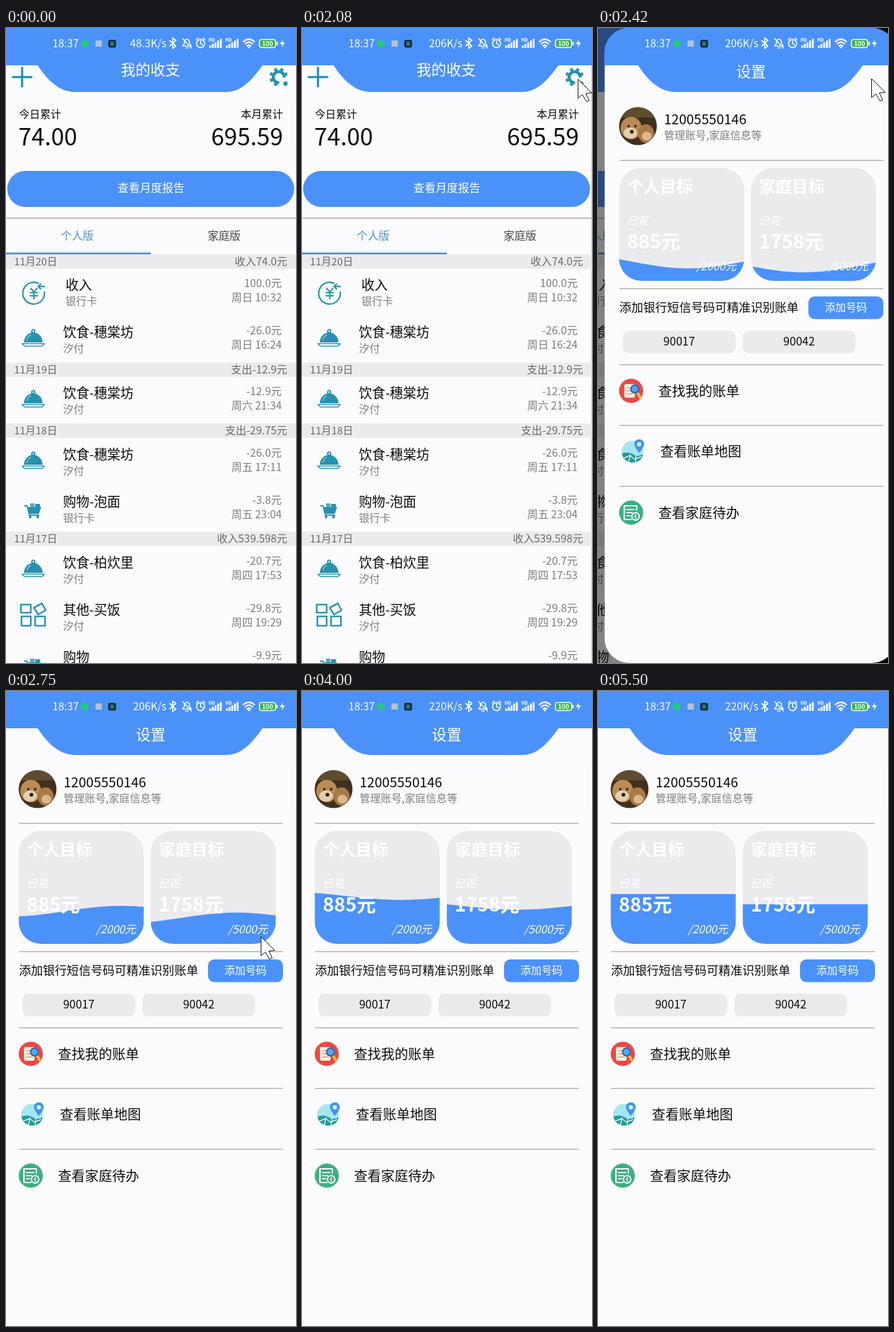
Recreate the animation shown at these times as an HTML page. Size 468 by 1022 pixels, loop 5910 ms.

```html
<!DOCTYPE html>
<html lang="zh-CN">
<head>
<meta charset="utf-8">
<title>我的收支</title>
<style>
html, body { margin: 0; width: 100%; height: 100%; overflow: hidden; background: #000; }
svg { display: block; width: 100vw; height: 100vh; }
text { font-family: "Noto Sans CJK SC", "Noto Sans CJK", "Noto Sans", sans-serif; white-space: pre; }
</style>
</head>
<body>
<svg id="stage" viewBox="0 0 468 1022" xmlns="http://www.w3.org/2000/svg"></svg>
<script>
const LOOP = 5910, STEP = 1000 / 12;
const BLUE = '#4b91fa', TEAL = '#2691b0', PAGE = '#fcfcfe', PALE = '#ebebee',
  INK = '#0c0c0c', GRAY = '#7d7d7a', RULE = '#a3a397';

const text = (x, y, size, str, fill = INK, attrs = '') =>
  `<text x="${x}" y="${y}" font-size="${size}" fill="${fill}" ${attrs}>${str}</text>`;
const END = 'text-anchor="end"', MID = 'text-anchor="middle"', MEDIUM = 'font-weight="500"',
  BOLD = 'font-weight="700"', ITALIC = 'font-style="italic"';
const rect = (x, y, w, h, fill, r = 0) =>
  `<rect x="${x}" y="${y}" width="${w}" height="${h}" rx="${r}" fill="${fill}"/>`;
const line = (x1, x2, y) => rect(x1, y - .6, x2 - x1, 1.3, RULE);
const at = (x, y, body) => `<g transform="translate(${x} ${y})">${body}</g>`;
const stroke = (d, color, width = 2) =>
  `<path d="${d}" fill="none" stroke="${color}" stroke-width="${width}" stroke-linecap="round" stroke-linejoin="round"/>`;
const shape = (d, fill) => `<path d="${d}" fill="${fill}"/>`;
const disc = (x, y, r, fill) => `<circle cx="${x}" cy="${y}" r="${r}" fill="${fill}"/>`;
const oval = (x, y, rx, ry, fill) => `<ellipse cx="${x}" cy="${y}" rx="${rx}" ry="${ry}" fill="${fill}"/>`;

const header = title => shape('M-4 -1H480V60H414C398 82 381 103 355 103H113C84 103 66 82 51 60H-4Z', BLUE) + title;

const icons = {
  income: stroke('M7 -16A17.500 17.500 0 1 0 17 -2M17 -11H7M11 -15L7 -11L11 -7', TEAL, 2.4) +
    stroke('M-5 -8L0 -2L5 -8M0 -2V9M-6 -1H6M-6 4H6', TEAL, 2.2),
  dish: shape('M-15 7A15 16 0 0 1 15 7Z', TEAL) + disc(0, -11, 3.5, TEAL) + disc(0, -11, 1.4, PAGE) +
    stroke('M-10 3A11 11 0 0 1 -4 -5', '#8cc6d5', 1.5) + stroke('M-18 9H18L14 13H-14Z', TEAL, 1.7),
  cart: stroke('M-14 -7H-10L-6 8H9', TEAL, 2) + shape('M-10 -5H13L9 6H-7Z', TEAL) +
    rect(-5, -11, 7, 6, '#5aa9b9') + rect(3, -10, 8, 5, TEAL) + disc(-5, 11, 2.2, TEAL) + disc(7, 11, 2.2, TEAL),
  blocks: stroke('M-17 -16H-4V-3H-20V-16ZM-19 3H-4V18H-19ZM3 3H19V18H3ZM1 -11L14 -18L20 -7L8 0Z', TEAL, 2.6),
  gear: stroke('M-1.500 9A9 9 0 1 1 9 -1.500', TEAL, 5) +
    `<path d="M-2.500 12.800A13 13 0 1 1 12.800 -2.500" fill="none" stroke="${TEAL}" stroke-width="4" stroke-dasharray="5 5.200"/>` +
    disc(11, 10.500, 3.5, TEAL),
  search: disc(0, 0, 19.500, '#ee4842') + rect(-11, -11, 17, 22, '#f6f1e8', 2) +
    stroke('M-7 -5H-1M-7 0H-1M-7 5H2', '#d5a063', 1.5) + stroke('M10 3L15 11', '#f5c33d', 4) +
    disc(6, -3, 7.500, '#2d6cb4') + disc(6, -3, 5, '#4fa4ee'),
  map: disc(-1, 1, 17.500, '#a8e5f2') + shape('M-18 4Q-8 0 0 5T16 5Q14 18 -1 18.500Q-15 17 -18 4Z', '#1e9c9b') +
    stroke('M-14 11L-5 7L3 13L13 9M-4 6L-7 17M5 7L4 17', '#e8f4f0', 1.5) +
    shape('M10 3Q2 -7 2 -11A8 8 0 0 1 18 -11Q18 -7 10 3Z', '#4294ea') + disc(10, -11, 3.5, '#d9effb'),
  todo: disc(0, 0, 19.500, '#3cb083') + stroke('M9 -4V-11H-11V11H0M-7 -5H5M-7 0H1M-7 5H-2', '#fff', 2.2) +
    disc(7, 6, 7, '#fff') + disc(7, 6, 5, '#3cb083') + stroke('M8 3L6 6L8 9', '#fff', 1.5)
};

const strips = [
  [376, '11月20日', '收入74.0元'], [550, '11月19日', '支出-12.9元'],
  [648, '11月18日', '支出-29.75元'], [822, '11月17日', '收入539.598元']
];
const rows = [
  [413, 'income', '收入', '银行卡', '100.0元', '周日 10:32'],
  [489, 'dish', '饮食-穗棠坊', '汐付', '-26.0元', '周日 16:24'],
  [587, 'dish', '饮食-穗棠坊', '汐付', '-12.9元', '周六 21:34'],
  [686, 'dish', '饮食-穗棠坊', '汐付', '-26.0元', '周五 17:11'],
  [762, 'cart', '购物-泡面', '银行卡', '-3.8元', '周五 23:04'],
  [860, 'dish', '饮食-柏炊里', '汐付', '-20.7元', '周四 17:53'],
  [936, 'blocks', '其他-买饭', '汐付', '-29.8元', '周四 19:29'],
  [1012, 'cart', '购物', '银行卡', '-9.9元', '周四 20:15']
];
const iconDrop = { income: 14, dish: 10, cart: 14, blocks: 8 };

const strip = ([y, day, sum]) => rect(0, y - 11.500, 468, 23, PALE) +
  text(13, y + 6, 16.5, day, '#6a6a6a') + text(454, y + 6, 17.2, sum, '#6a6a6a', END);
const row = ([y, icon, title, sub, sum, time]) => {
  const x = icon === 'income' ? 96 : 92;
  return at(x === 96 ? 45 : 44, y + iconDrop[icon], icons[icon]) +
    text(x, y + 8, 21.3, title, INK, MEDIUM) + text(x, y + 32.500, 17, sub, GRAY) +
    text(445, y + 4, 17.4, sum, GRAY, END) + text(445, y + 27, 17.2, time, GRAY, END);
};

const home = rect(0, 0, 468, 1022, PAGE) + header(text(233, 76, 24, '我的收支', '#fff', MID)) +
  stroke('M26 64V94M11 79H41', TEAL, 3.6) + at(440, 79, icons.gear) +
  text(21, 145, 17, '今日累计', INK, MEDIUM) + text(447, 145, 17, '本月累计', INK, `${END} ${MEDIUM}`) +
  text(20, 189, 38, '74.00') + text(447, 189, 38, '695.59', INK, END) +
  rect(2, 230, 463, 58, BLUE, 29) + text(234, 264, 18, '查看月度报告', '#fff', `${MID} ${MEDIUM}`) +
  rect(0, 305.500, 468, 1.2, '#8d8d88') +
  text(115, 341, 17.7, '个人版', '#4793c8', MID) + text(352, 341, 17.7, '家庭版', '#444', MID) +
  rect(0, 361.500, 234, 3, '#458bd8') + strips.map(strip).join('') + rows.map(row).join('');

const goals = [
  { x: 20.5, name: '个人目标', spent: 885, limit: 2000, lag: 0 },
  { x: 233.5, name: '家庭目标', spent: 1758, limit: 5000, lag: .13 }
];
const CARD = { y: 225, w: 202, h: 182, r: 36 };
const goalCard = ({ x, name, spent, limit }, i) => at(x, 0,
  `<clipPath id="clip${i}">${rect(0, CARD.y, CARD.w, CARD.h, '#000', CARD.r)}</clipPath>` +
  rect(0, CARD.y, CARD.w, CARD.h, PALE, CARD.r) +
  `<path id="wave${i}" fill="${BLUE}" clip-path="url(#clip${i})"/>` +
  text(13, 265, 26.4, name, '#fff', BOLD) + text(13, 316, 17, '已花', '#fff', ITALIC) +
  text(13, 355, 31, spent + '元', '#fff', BOLD) +
  text(189, 390, 17.8, `/${limit}元`, '#fff', `${END} ${ITALIC}`));
const chip = (x, label) => rect(x, 487, 182, 36.500, PALE, 10) + text(x + 91, 511, 18.3, label, INK, MID);
const menuItem = (y, icon, x, label) => at(x - 44, y, icons[icon]) + text(x, y + 8, 21.8, label);

const avatar = '<clipPath id="face"><circle cx="51" cy="158" r="30.500"/></clipPath><g clip-path="url(#face)">' +
  rect(20, 127, 62, 62, '#3f3020') + rect(20, 127, 62, 17, '#5d4c2e') +
  oval(40, 161, 17, 18, '#b98a55') + oval(39, 169, 11, 9, '#e3cfae') +
  oval(64, 170, 13, 15, '#a87845') + oval(65, 174, 8, 7, '#d6b98f') +
  disc(36, 158, 2, '#2b2115') + disc(47, 158, 2, '#2b2115') + disc(41, 167, 3, '#2b2115') + '</g>';

const settings = `<clipPath id="edge"><rect id="sheet" x="-3" width="471" height="1022"/></clipPath><g clip-path="url(#edge)">` +
  rect(-3, 0, 471, 1022, PAGE) + header(text(233.5, 79, 24, '设置', '#fff', MID)) + avatar +
  text(93, 155, 21.8, '12005550146') + text(93, 179, 17, '管理账号,家庭信息等', GRAY) +
  [213, 419.5, 542, 639.5, 737.5].map(y => line(21, 447, y)).join('') + goals.map(goalCard).join('') +
  text(21, 457, 19.3, '添加银行短信号码可精准识别账单') +
  rect(326, 432, 121, 36.500, BLUE, 10) + text(386.500, 456, 17, '添加号码', '#fff', MID) +
  chip(26.5, '90017') + chip(220, '90042') +
  menuItem(584, 'search', 84, '查找我的账单') + menuItem(681, 'map', 87, '查看账单地图') +
  menuItem(780, 'todo', 84, '查看家庭待办') + '</g>';

const signal = x => text(x, 22, 7, 'HD', '#fff', BOLD) +
  [0, 1, 2, 3, 4].map(i => rect(x + 1 + i * 4.3, 28 - i * 2.6, 3, 4 + i * 2.6, '#fff')).join('');
const statusBar = text(75, 31, 17, '18:37', '#fff', MEDIUM) +
  disc(127, 25, 6, '#25c97c') + rect(144.5, 20, 10, 10, '#b9c3ce', 1) + rect(165, 19, 12.500, 12.500, '#142b35', 3) +
  rect(168, 22, 6.500, 6.500, '#2f7185', 1) +
  `<text id="speed" x="259" y="31" font-size="17" fill="#fff" ${END} ${MEDIUM}></text>` +
  stroke('M264 20L274 29L269 33V16L274 20L264 29', '#fff', 1.7) +
  stroke('M285 29H299L296 25V21Q292 15 288 21V25ZM290 32H294M285 17L299 32', '#fff', 1.7) +
  '<circle cx="314" cy="25" r="6.500" fill="none" stroke="#fff" stroke-width="1.800"/>' +
  stroke('M314 21V25L317 27M307 19L310 16M318 16L321 19', '#fff', 1.7) + signal(327) + signal(354) +
  stroke('M383 22Q392 14 401 22M386 25.500Q392 20 398 25.500M389 29Q392 26 395 29', '#fff', 2.2) + disc(392, 31, 1.7, '#fff') +
  '<rect x="409" y="18.500" width="26" height="13" rx="3.500" fill="#43b34d" stroke="#fff" stroke-width="1.500"/>' +
  rect(436.500, 22, 2, 6, '#fff', 1) + text(422, 29, 10, '100', '#fff', `${MID} ${BOLD}`) +
  shape('M447 18L442 26H446L445 32L450 23H446Z', '#fff');

const stage = document.getElementById('stage');
stage.innerHTML = `<rect width="468" height="1022"/><g id="home">${home}</g><rect id="dim" width="468" height="1022"/>` +
  `<g id="settings">${settings}</g>` + rect(460, 122, 2.500, 70, '#f6f6f8') + statusBar +
  '<path id="cursor" d="M.5 .5V31L7.500 25L14 36.500L18.500 34.500L13 23.500L22.500 22.500Z" fill="#fff" stroke="#000"/>';
const el = id => document.getElementById(id);

// Each row: time, then the values at that time.
const slide = [[2083, 471], [2167, 385], [2250, 174], [2333, 52], [2417, 13.5], [2500, 3], [2583, 0]];
const swell = [[2167, 14], [2417, 11], [3333, 4.7], [4583, 7.8], [5250, 3], [5500, 0]];
const pointer = [
  [83, 330, 959], [667, 305, 63], [833, 305, 62], [1083, 400, 64], [1250, 400, 64], [1500, 445, 100],
  [1667, 445, 82], [2250, 445, 82], [2417, 441, 81], [2583, 432, 150], [3000, 380, 760],
  [3250, 371, 858], [3333, 371, 858], [3583, 366, 1030]
];
function lookup(table, t, col = 1) {
  if (t <= table[0][0]) return table[0][col];
  const i = table.findIndex(k => k[0] >= t);
  if (i < 0) return table[table.length - 1][col];
  const a = table[i - 1], b = table[i];
  return a[col] + (b[col] - a[col]) * (t - a[0]) / (b[0] - a[0]);
}

function wavePath({ spent, limit, lag }, t) {
  const rise = 1 - Math.exp(-1.7 * Math.max(0, t - 2130) / 1000);
  const bottom = CARD.y + CARD.h;
  const level = bottom - CARD.h * spent / limit * rise;
  const trough = .55 - lag + 3.5 * (t - 2417) / 1000;
  const size = lookup(swell, t);
  let d = `M0 ${bottom}`;
  for (let i = 0; i <= 16; i++) {
    const u = i / 16;
    d += `L${u * CARD.w} ${level + size * Math.cos((u - trough) * 2 * Math.PI / 1.8)}`;
  }
  return d + `L${CARD.w} ${bottom}Z`;
}

function render(now) {
  const t = Math.floor((now % LOOP + 4) / STEP) * STEP + .5;
  const x = lookup(slide, t), shown = (471 - x) / 471;
  el('home').setAttribute('transform', `translate(${-120 * shown} 0)`);
  el('dim').setAttribute('opacity', .5 * shown);
  el('settings').setAttribute('transform', `translate(${x} 0)`);
  el('settings').setAttribute('visibility', t > 2100 ? 'visible' : 'hidden');
  el('sheet').setAttribute('rx', x > 0 ? 40 : 0);
  goals.forEach((goal, i) => el('wave' + i).setAttribute('d', wavePath(goal, t)));
  el('speed').textContent = t < 500 ? '48.3K/s' : t < 3500 ? '206K/s' : '220K/s';
  const pointing = t > 80 && t < 3583 && !(t > 1249 && t < 1499);
  el('cursor').setAttribute('visibility', pointing ? 'visible' : 'hidden');
  el('cursor').setAttribute('transform', `translate(${lookup(pointer, t)} ${lookup(pointer, t, 2)})`);
}

const start = performance.now();
function tick() {
  render(performance.now() - start);
  requestAnimationFrame(tick);
}
tick();
</script>
</body>
</html>
```
